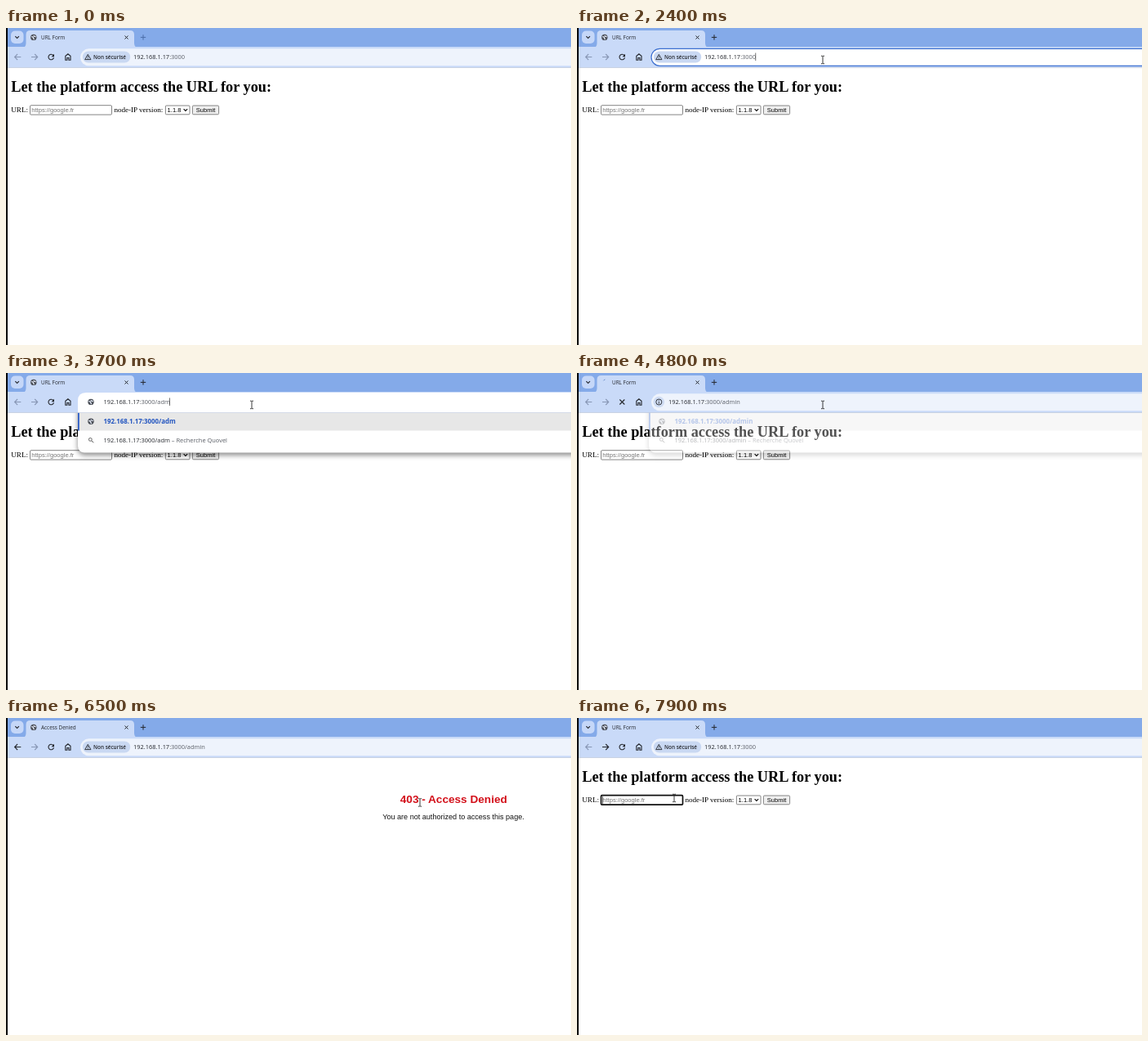
These frames come from a looping animation (692x388 px, 8000 ms). An HTML page:

```html
<!DOCTYPE html>
<html lang="en">
<head>
<meta charset="utf-8">
<title>URL Form</title>
<style>
  html, body { margin: 0; width: 100%; height: 100%; overflow: hidden; background: #fff; }
  svg { display: block; }
  text { white-space: pre; }
  .ui { font-family: "Open Sans", "Noto Sans", sans-serif; }
  .serif { font-family: "Liberation Serif", serif; }
  .sans { font-family: "Liberation Sans", sans-serif; }
</style>
</head>
<body>
<svg id="stage" width="692" height="388" viewBox="0 0 692 388"></svg>
<script>
const LOOP = 8000, STEP = 100;
const HOST = '192.168.1.17', PORT = ':3000';
const INK = '#24272d', MUTED = '#8796b4', GREY = '#5a5e66', URL_SIZE = 7.43;
const stage = document.getElementById('stage');
const pen = document.createElement('canvas').getContext('2d');

const clamp = v => Math.max(0, Math.min(1, v));
const lastOf = (list, t) => list.filter(([at]) => at <= t).pop()[1];

const rect = (x, y, w, h, fill, rx = 0, extra = '') =>
  `<rect x="${x}" y="${y}" width="${w}" height="${h}" rx="${rx}" fill="${fill}" ${extra}/>`;
const line = (d, color, width = 1, extra = '') =>
  `<path d="${d}" fill="none" stroke="${color}" stroke-width="${width}" ${extra}/>`;
const text = (x, y, size, body, cls = 'ui', fill = INK, extra = '') =>
  `<text x="${x}" y="${y}" font-size="${size}" class="${cls}" fill="${fill}" ${extra}>${body}</text>`;
const tint = (body, fill) => `<tspan fill="${fill}">${body}</tspan>`;

function urlEnd(x, path) {
  pen.font = `${URL_SIZE}px "Open Sans", "Noto Sans", sans-serif`;
  return x + pen.measureText(HOST + PORT + path).width - 0.6;
}
const caret = (x, y = 30.5) => rect(x, y, 0.7, 9.5, '#333');

const globe = (x, y) => `<circle cx="${x}" cy="${y}" r="3.7" fill="#4b4f57"/>` +
  line(`M${x - 2.7} ${y - 0.8}q2.4 0 2.4 1.4t1.2 1.9M${x + 0.2} ${y - 2.5}q0 1.7 2.6 1.6`, '#e4ebf8', 1.3);

// Mouse path: time, x, y
const path = [
  [1200, 668, 233], [1400, 560, 150], [1600, 350, 62], [1800, 283.5, 39], [2000, 301, 39],
  [5400, 301, 39], [5500, 257, 66], [5600, 310, 98], [5800, 470, 107], [5900, 506, 104],
  [6400, 506, 104], [6500, 507, 103.5], [6700, 507, 103.5], [6900, 240, 70], [7100, 15, 37],
  [7200, 16, 38], [7500, 112, 97], [7600, 124, 98], [7700, 124, 98], [7800, 121, 98], [7900, 119, 98],
];

function mouseAt(t) {
  const i = path.findIndex(p => p[0] >= t);
  const b = path[i], a = path[Math.max(0, i - 1)];
  const k = b === a ? 0 : (t - a[0]) / (b[0] - a[0]);
  return [a[1] + (b[1] - a[1]) * k, a[2] + (b[2] - a[2]) * k];
}

function cursor(t) {
  if (t < path[0][0]) return '';
  const [x, y] = mouseAt(t);
  const inside = (l, top, r, b) => x > l && x < r && y > top && y < b;
  const overText = inside(154, 25, 692, 47) || (t > 7150 && inside(29, 94, 130, 107)) ||
    (t > 4800 && t < 7150 && inside(482, 92, 614, 110));
  return overText
    ? line(`M${x - 2} ${y - 4.8}h1.5l.5 .5l.5 -.5h1.5M${x} ${y - 4.3}v8.5M${x - 2} ${y + 4.7}h1.5l.5 -.5l.5 .5h1.5`, '#222', 0.9)
    : `<path d="M${x} ${y}v10l2.3 -2.1l1.6 3.6l1.5 -.7l-1.6 -3.4h3.2z" fill="#fff" stroke="#111" stroke-width=".7"/>`;
}

function formPage(focused, showCaret) {
  return text(6.3, 77.8, 18.28, 'Let the platform access the URL for you:', 'serif', '#000', 'font-weight="700"') +
    text(6.3, 103, 9.07, 'URL:', 'serif', '#000') +
    rect(29.5, 94.7, 100, 11.4, '#fff', 1.2, `stroke="${focused ? '#101010' : '#767676'}" stroke-width="${focused ? 1.7 : 0.9}"`) +
    text(31.3, 102.9, 7.56, 'https://google.fr', 'sans', '#757575') +
    (showCaret ? caret(31, 96) : '') +
    text(132.4, 103, 9.07, 'node-IP version:', 'serif', '#000') +
    rect(195.4, 95, 29.6, 10.8, '#fff', 1, 'stroke="#767676" stroke-width=".9"') +
    text(197.6, 103, 7.56, '1.1.8', 'sans', '#000') +
    line('M217.6 99.2l2.3 2.3l2.3 -2.3', '#111', 1.2) +
    rect(228.4, 95, 32.2, 10.8, '#efefef', 1.3, 'stroke="#767676" stroke-width=".9"') +
    text(244.5, 103, 7.56, 'Submit', 'sans', '#000', 'text-anchor="middle"');
}

const deniedPage = () =>
  text(548.3, 103.8, 13.6, '403 - Access Denied', 'sans', '#d3101a', 'font-weight="700" text-anchor="middle"') +
  text(548, 124, 9.07, 'You are not authorized to access this page.', 'sans', '#111', 'text-anchor="middle"');

function suggestions(opacity, typed) {
  const full = HOST + PORT + typed;
  return `<g opacity="${opacity}">` +
    rect(88, 24, 640, 73.5, '#fff', 8, 'style="filter:drop-shadow(0 3px 3px #0007)"') +
    rect(88, 48, 640, 22.5, '#e7e7e7') + rect(88, 48, 1.8, 22.5, '#2c5cc5') +
    globe(104, 59.3) +
    text(119.5, 62, 7.9, typed === '/' ? HOST + PORT : full, 'ui', '#2456c0', 'font-weight="700"') +
    '<circle cx="103.3" cy="81.4" r="1.9" fill="none" stroke="#555" stroke-width=".9"/>' +
    line('M104.8 82.9l2.4 2.4', '#555') +
    text(119.5, 84.9, URL_SIZE, full + tint(' – Recherche Quovel', GREY)) + '</g>';
}

function tabStrip(title, loading, plusColor) {
  return rect(0, 0, 692, 24, '#84aae9') +
    rect(6, 3.5, 15.5, 15.5, '#c5d7f8', 5) + line('M11.3 10.2l2.3 2.3l2.3 -2.3', INK, 1.1) +
    '<path d="M19 24q5.5 0 5.5 -5.5V8q0 -5 5 -5H152q5 0 5 5V18.5q0 5.5 5.5 5.5z" fill="#c9daf8"/>' +
    (loading ? line('M32.5 9.3a3.5 3.5 0 0 1 1.8 -1.3', '#5c7fc0') : globe(33.8, 11.4)) +
    text(43, 14, 6.4, title) +
    line('M145.5 9.5l4 4m0 -4l-4 4', INK) +
    line('M168 8.2v6.4M164.8 11.4h6.4', plusColor);
}

function navigation(back, forward, loading, hoverBack) {
  const arrow = (x, dir, on) =>
    line(`M${x - 3.8} 35.5h7.6M${x + dir * 0.4} 32l${dir * 3.5} 3.5l${-dir * 3.5} 3.5`, on ? INK : MUTED, 1.1);
  return rect(0, 23, 692, 25.5, '#c9daf8') + rect(0, 48.3, 692, 0.7, '#bec8da') +
    (hoverBack ? '<circle cx="14.5" cy="35.5" r="10" fill="#b5c9ec"/>' : '') +
    arrow(14.5, -1, back) + arrow(34.8, 1, forward) +
    (loading
      ? line('M52.3 32.5l6 6m0 -6l-6 6', INK, 1.1)
      : line('M58 33.6a3.3 3.3 0 1 0 .5 2.7', INK, 1.1) + `<path d="M59 31.8v3.4h-3.4z" fill="${INK}"/>`) +
    line('M72.8 39.2v-5l3.1 -2.5l3.1 2.5v5h-2.1v-2.7h-2v2.7z', INK, 1.1);
}

function addressBar(t, typing, loading, typed) {
  const url = x => text(x, 38.2, URL_SIZE, HOST + tint(PORT + typed, GREY));
  if (typing) {
    return '<path d="M88 48.3V34q0 -10 10 -10H692V48.3z" fill="#fff"/>' + globe(104, 35.4) + url(119.5) +
      (t < 4500 ? caret(urlEnd(119.5, typed)) : '');
  }
  const focused = t >= 2000 && t < 3000;
  const hovered = t >= 1700 && t < 2000;
  const bar = rect(91, 25.3, 640, 21, focused ? '#fff' : hovered ? '#e6edf9' : '#eef3fc', 10.5,
    focused ? 'stroke="#3c6fd0" stroke-width="1.2"' : '');
  if (loading) {
    return bar + '<circle cx="100.3" cy="35.5" r="6.8" fill="#cfdcf3"/>' +
      `<circle cx="100.3" cy="35.5" r="3.5" fill="none" stroke="${INK}" stroke-width=".9"/>` +
      line('M100.3 33.4v.9M100.3 35.1v2.5', INK, 0.9) + url(112);
  }
  return bar + rect(93.8, 28.6, 58.4, 13.8, '#c9d8f2', 6.9) +
    line('M96.7 38.6l3.6 -6.3l3.6 6.3z', INK, 0.9) + line('M100.3 34.5v1.9M100.3 37v.8', INK, 0.8) +
    text(107, 37.9, 6.4, 'Non sécurisé', 'ui', INK, 'font-weight="600"') +
    (t === 2000 ? rect(156, 30, 63.5, 10.5, '#a9c8f7') : '') + url(156) +
    (t >= 2100 && t < 2700 ? caret(urlEnd(156, '')) : '');
}

function draw(t) {
  const typing = t >= 3000 && t < 4800;
  const loading = t >= 4800 && t < 4900;
  const denied = t >= 4900 && t < 7200;
  const focused = t >= 7600;
  const typed = lastOf([[0, ''], [3000, '/'], [3300, '/a'], [3500, '/ad'], [3700, '/adm'],
    [3800, '/admi'], [4000, '/admin'], [7200, '']], t);
  const popup = loading ? 0.33 : typing ? clamp((t - 2880) / 490) : 0;

  stage.innerHTML = rect(0, 0, 692, 388, '#fff') +
    (denied ? deniedPage() : formPage(focused, focused)) +
    (popup ? suggestions(popup, typed) : '') +
    tabStrip(denied ? 'Access Denied' : 'URL Form', loading, t < 1000 ? '#4a6da8' : INK) +
    navigation(denied, t >= 7200, loading, t >= 7100 && t < 7300) +
    addressBar(t, typing, loading, typed) +
    rect(0, 0, 2, 388, '#000') + cursor(t);
}

let shown = -1;
function tick(now) {
  const t = Math.floor((now % LOOP) / STEP) * STEP;
  if (t !== shown) draw(shown = t);
  requestAnimationFrame(tick);
}
draw(0);
requestAnimationFrame(tick);
</script>
</body>
</html>
```
